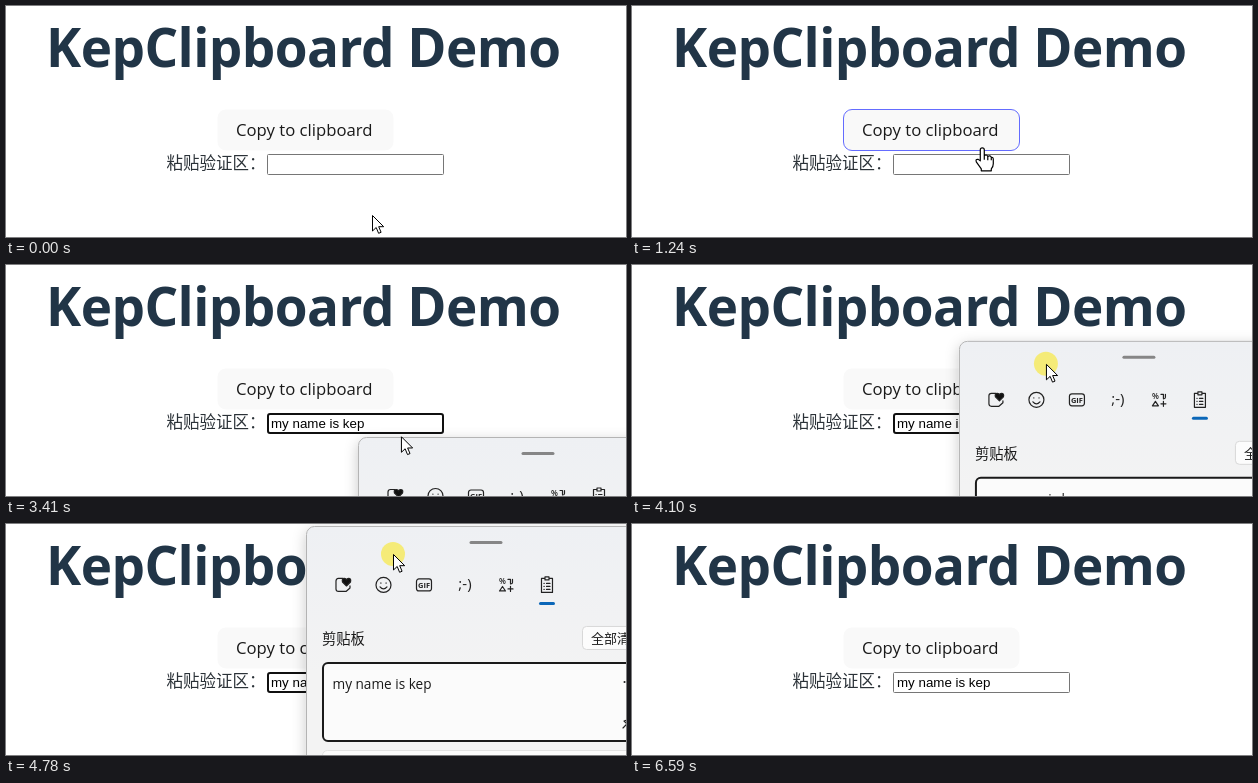
Write an HTML page that moves like this. It is 620x231 px and loops after 6.66 s.

```html
<!DOCTYPE html>
<html lang="zh-CN">
<head>
<meta charset="utf-8">
<title>Clipboard demo</title>
<style>
html, body { margin: 0; height: 100%; overflow: hidden; background: #fff; }
svg { display: block; }
text { font-family: "Open Sans", "Noto Sans", "Noto Sans CJK SC", "Noto Sans CJK", sans-serif; fill: #1a1a1a; white-space: pre; }
.title { font-size: 53px; font-weight: 700; letter-spacing: -.55px; fill: #213547; }
.field { font: 13.33px "Liberation Sans", Arial, sans-serif; fill: #000; }
.icon { fill: none; stroke: #222; stroke-width: 1.2; stroke-linecap: round; stroke-linejoin: round; }
.icon text { stroke: none; fill: #222; text-anchor: middle; }
.cursor { fill: #fff; stroke: #000; stroke-linejoin: round; }
</style>
</head>
<body>
<svg width="620" height="231" viewBox="0 0 620 231">
  <defs>
    <linearGradient id="mica" x1="0" y1="0" x2="0" y2="1">
      <stop offset="0" stop-color="#eef0f3"/>
      <stop offset=".35" stop-color="#f3f3f3"/>
    </linearGradient>
    <filter id="shadow" x="-20%" y="-20%" width="140%" height="140%">
      <feDropShadow dx="0" dy="4" stdDeviation="7" flood-opacity=".22"/>
    </filter>
  </defs>

  <text class="title" x="40" y="61">KepClipboard Demo</text>
  <rect id="button" x="211.5" y="103.5" width="176" height="41" rx="8.5" fill="#f9f9f9"/>
  <text x="230" y="130" font-size="16.7">Copy to clipboard</text>
  <text x="160.5" y="163" font-size="16.5" style="fill:#2b3238">粘贴验证区：</text>
  <rect id="input" fill="#fff"/>
  <text id="value" class="field" x="265" y="163">my name is kep</text>
  <path id="caret" d="M265.5 151.5v15" stroke="#000"/>

  <g id="panel">
    <rect x=".5" y=".5" width="360" height="420" rx="8" fill="url(#mica)" stroke="#b4b4b4" filter="url(#shadow)"/>
    <path d="M165 16.5h30" stroke="#868686" stroke-width="3" stroke-linecap="round"/>
    <g class="icon">
      <g transform="translate(37 59)">
        <path d="M0-6.5H-4.500Q-7-6.500-7-4V4Q-7 6.500-4.500 6.500H3L7 3V1"/>
        <path d="M3.500 1L-.5-3Q-1.500-6.500 1.500-6.500Q3-6.500 3.500-5Q4-6.500 5.500-6.500Q8.500-6.500 7.500-3z" fill="#111"/>
      </g>
      <g transform="translate(77.500 59)">
        <circle r="7.500"/>
        <path d="M-3.500 2Q0 6 3.500 2M-2.600-2v.2M2.600-2v.2"/>
      </g>
      <g transform="translate(118 59)">
        <rect x="-7.500" y="-6" width="15" height="12" rx="2.500"/>
        <text y="2.800" font-size="7.500" font-weight="700">GIF</text>
      </g>
      <text x="159" y="63.500" font-size="15">;-)</text>
      <g transform="translate(200 59)">
        <text x="-3.500" y="-.5" font-size="8" font-weight="600">%</text>
        <path d="M2-5.500h2.500v4M6.500-5.500v3q0 1.500-2 1.500M-6.500 6L-3.500 1.500L-.5 6zM2 4h5M4.500 1.500v5"/>
      </g>
      <g transform="translate(241 59)">
        <path d="M-2-6.500h-3.500v14h11v-14H2M-2-8h4v3h-4zM-3-1.500h.2M-3 1.500h.2M-3 4.500h.2M-.5-1.500h3.500M-.5 1.500h3.500M-.5 4.500h3.500"/>
      </g>
    </g>
    <path d="M234.500 77.500h13" stroke="#0b67b8" stroke-width="3" stroke-linecap="round"/>
    <text x="16" y="118" font-size="14.300">剪贴板</text>
    <rect x="276.500" y="100.500" width="70" height="23" rx="4" fill="#fcfcfc" stroke="#d8d8d8"/>
    <text x="285" y="117.500" font-size="13">全部清除</text>
    <rect x="17" y="137" width="328" height="78" rx="5" fill="#fbfbfb" stroke="#1a1a1a" stroke-width="2"/>
    <text x="26.500" y="163" font-size="13.600">my name is kep</text>
    <path d="M318.500 156h.1M323 156h.1M327.500 156h.1" stroke="#222" stroke-width="2" stroke-linecap="round"/>
    <path class="icon" d="M317 202l4-4M318 195l7 7 1-4 3-3-4-4-3 3z"/>
    <rect x="16.500" y="224.500" width="329" height="78" rx="5" fill="#fbfbfb" stroke="#e2e2e2"/>
  </g>

  <g id="pointer">
    <circle id="press" r="12" fill="#f7e948" opacity=".72"/>
    <path id="arrow" class="cursor" d="M.5.5V16l3.700-3.500 2.400 5.800 2.500-1L6.700 11.700h5z"/>
    <path id="hand" class="cursor" stroke-width="1.200" d="M-2 12V2Q-2 0 0 0T2 2V8Q4 6 5.500 8.500Q8 7 9 9.500Q11 9 11 11.500V16Q11 19 9 21V23H-1V21L-6 14Q-7 11-4 11.500L-2 13zM2 8v4M5.500 8.500v4M9 9.500v3"/>
    <path id="beam" d="M-3-7.500h2.500l.5.500.5-.5h2.500M0-7V7M-3 7.500h2.500l.5-.5.5.5h2.500" fill="none" stroke="#222"/>
  </g>
</svg>
<script>
const LOOP = 6660;
const el = id => document.getElementById(id);
const set = (id, attrs) => {
  for (const k in attrs) el(id).setAttribute(k, attrs[k]);
};
const show = (id, on) => set(id, { visibility: on ? "visible" : "hidden" });
const during = (t, a, b) => t >= a && t < b;

// Each key is [time, ...values]; values are interpolated linearly.
const pointerKeys = [
  [70, 366, 209], [550, 340, 134], [1120, 340, 134], [1520, 374, 160],
  [3250, 374, 160], [3750, 439, 195], [3820, 439, 195], [4100, 414, 99],
  [4380, 393, 51], [4520, 393, 51], [4780, 387, 30], [4920, 386, 26],
  [5060, 386, 26], [5600, 650, 20]
];
const panelKeys = [
  [3110, 352, 192], [3250, 352, 172], [3820, 352, 172], [4100, 327, 76],
  [4380, 306, 24], [4520, 306, 24], [4780, 300, 2], [4920, 299, -2]
];
const fadeKeys = [[3110, 0], [3250, 1], [5640, 1], [5700, .88], [5800, .5], [5970, 0]];

function track(keys, t) {
  const i = keys.findIndex(k => k[0] > t);
  if (i < 0) return keys[keys.length - 1].slice(1);
  if (i === 0) return keys[0].slice(1);
  const a = keys[i - 1], b = keys[i], u = (t - a[0]) / (b[0] - a[0]);
  return a.slice(1).map((v, j) => v + (b[j + 1] - v) * u);
}

function pointerKind(x, y, overPanel) {
  if (overPanel) return "arrow";
  if (x > 211 && x < 388 && y > 103 && y < 145) return "hand";
  if (x > 261 && x < 438 && y > 148 && y < 169) return "beam";
  return "arrow";
}

function draw(t) {
  const [x, y] = track(pointerKeys, t);
  const [px, py] = track(panelKeys, t);
  const [alpha] = track(fadeKeys, t);
  const kind = pointerKind(x, y, alpha > 0 && x > px && y > py);
  const focused = during(t, 2350, 6520);

  set("button", { stroke: kind === "hand" ? "#646cff" : "none" });
  set("input", focused
    ? { x: 262, y: 149, width: 175, height: 19, rx: 2, stroke: "#101010", "stroke-width": 2 }
    : { x: 261.5, y: 148.5, width: 176, height: 20, rx: 1, stroke: "#767676", "stroke-width": 1 });
  show("value", t >= 2900);
  show("caret", during(t, 2350, 2900));
  set("panel", { transform: `translate(${px} ${py})`, opacity: alpha });
  set("pointer", { transform: `translate(${x} ${y})` });
  show("press", during(t, 970, 1120) || during(t, 2350, 2620) || during(t, 3820, 5060));
  for (const k of ["arrow", "hand", "beam"]) show(k, k === kind);
}

const start = performance.now();
function frame() {
  draw((performance.now() - start) % LOOP);
  requestAnimationFrame(frame);
}
frame();
</script>
</body>
</html>
```
